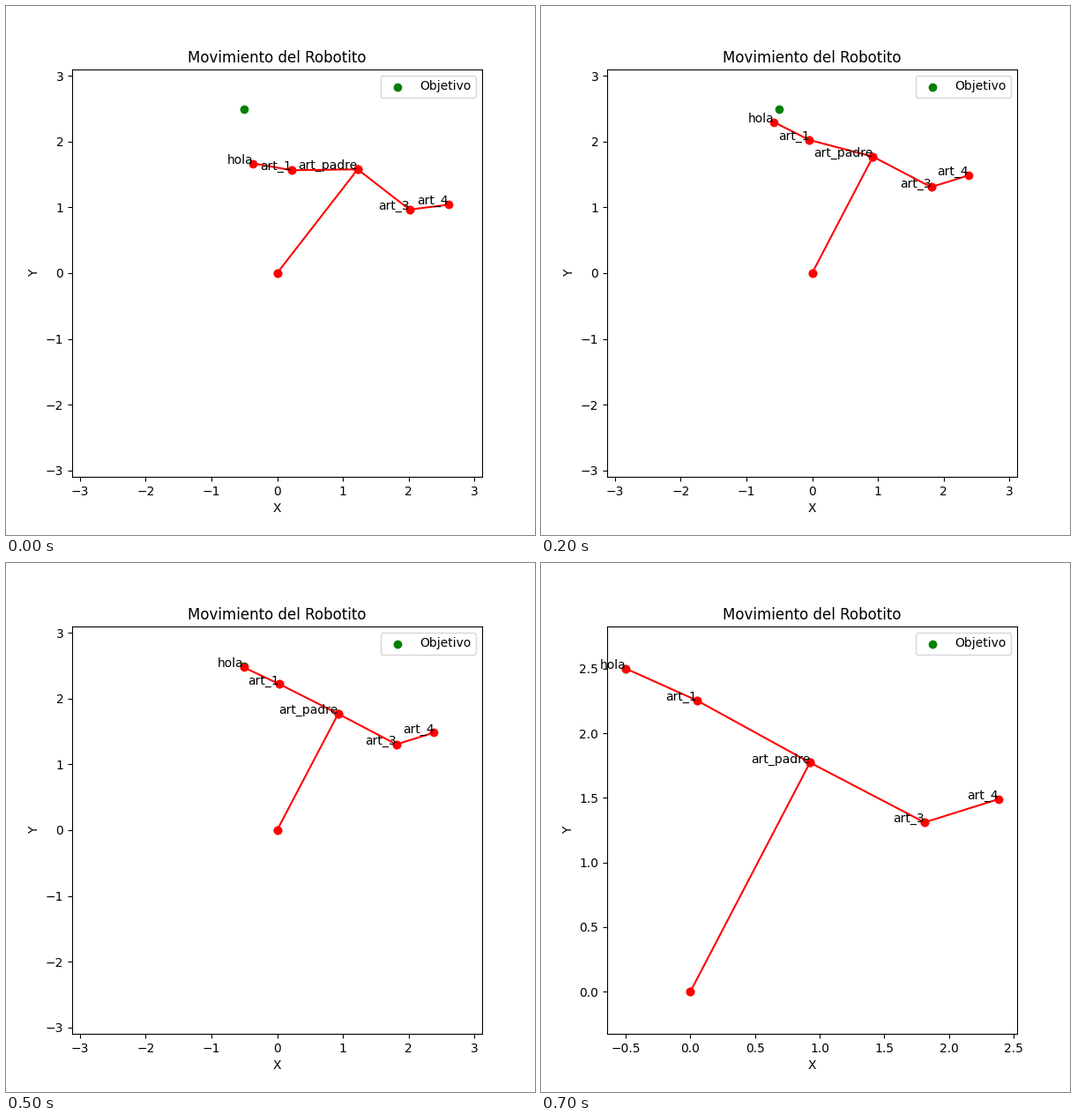
A matplotlib script for the animation above (0.8 s loop, 600x600 px).

```python
import numpy as np
import matplotlib.pyplot as plt
from matplotlib.animation import FuncAnimation

plt.rcParams["font.family"] = "DejaVu Sans"

FRAMES = 8
GOAL = np.array([-0.5, 2.5])
LENGTHS = dict(base=2.0, mid=1.0, end=0.6)
WIDTH, HEIGHT = 465, 462  # axes size in pixels

# Absolute angles in degrees of the shared link and the two links that reach the goal
KEY_TIMES = [0, 1, 2, 3, 4, 5, 6]
SHARED = [52.2, 57.7, 62.43, 62.25, 62.1, 62.3, 62.43]
MIDDLE = [180.8, 152.7, 165.3, 160.0, 156.1, 153.2, 151.2]
TIP = [170.0, 129.2, 153.3, 153.2, 153.1, 154.8, 155.9]

fig = plt.figure(figsize=(6, 6), dpi=100)
ax = fig.add_subplot()


def step(start, length, degrees):
    angle = np.radians(degrees)
    return start + length * np.array([np.cos(angle), np.sin(angle)])


def joints(frame):
    shared, middle, tip = (np.interp(frame, KEY_TIMES, track)
                           for track in (SHARED, MIDDLE, TIP))
    base = np.zeros(2)
    parent = step(base, LENGTHS["base"], shared)
    left = step(parent, LENGTHS["mid"], middle)
    left_end = step(left, LENGTHS["end"], tip)
    # The right branch is rigid and turns with the shared link
    right = step(parent, LENGTHS["mid"], shared - 90)
    right_end = step(right, LENGTHS["end"], shared - 45)
    return [
        (base, parent, "art_padre"),
        (parent, left, "art_1"),
        (left, left_end, "hola"),
        (parent, right, "art_3"),
        (right, right_end, "art_4"),
    ]


def set_view(links, fitted):
    if fitted:
        points = np.array([end for _, end, _ in links] + [np.zeros(2), GOAL])
        low, high = points.min(axis=0), points.max(axis=0)
        center = (low + high) / 2
        half_x = (high[0] - low[0]) * 0.55
        half_y = half_x * HEIGHT / WIDTH
    else:
        center = np.zeros(2)
        half_y = 3.1
        half_x = half_y * WIDTH / HEIGHT
    ax.set_xlim(center[0] - half_x, center[0] + half_x)
    ax.set_ylim(center[1] - half_y, center[1] + half_y)


def draw(frame):
    ax.clear()
    links = joints(frame)
    ax.scatter(*GOAL, color="green", label="Objetivo")
    for start, end, name in links:
        ax.plot(*zip(start, end), "ro-")
        ax.text(*end, name, ha="right")
    ax.plot(0, 0, "ro")
    set_view(links, fitted=frame == FRAMES - 1)
    ax.set_title("Movimiento del Robotito")
    ax.set_xlabel("X")
    ax.set_ylabel("Y")
    ax.legend(loc="upper right")
    return []


anim = FuncAnimation(fig, draw, frames=FRAMES, init_func=lambda: draw(0),
                     interval=100, repeat=True, repeat_delay=0)
plt.show()
```
